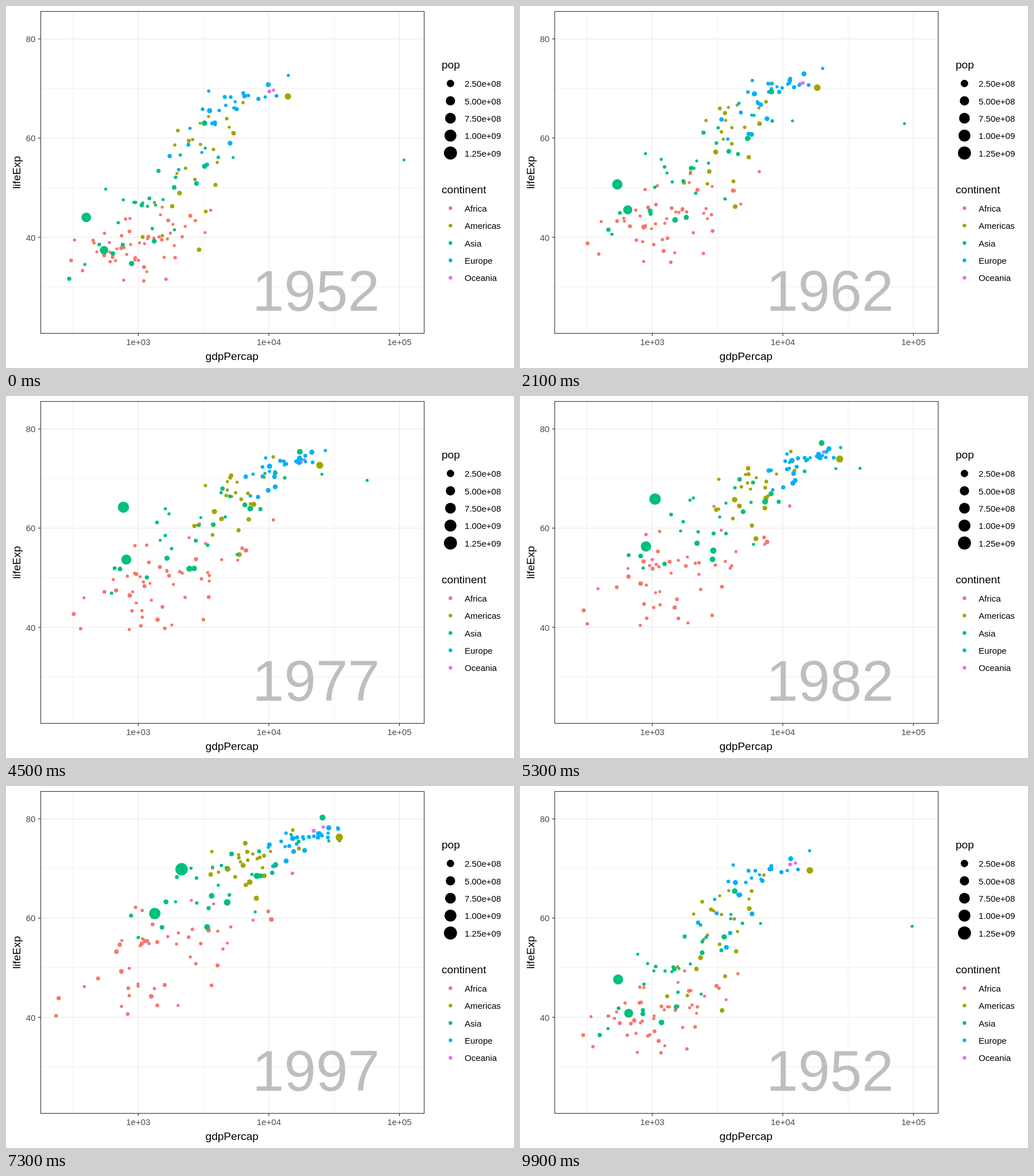
Recreate the animation shown at these times as an HTML page. Size 885 by 632 pixels, loop 10 s.

```html
<!DOCTYPE html>
<html lang="en">
<head>
<meta charset="utf-8">
<title>Life expectancy and income</title>
<style>
  html, body { margin: 0; width: 100%; height: 100%; overflow: hidden; background: #fff; }
  svg { display: block; font-family: "Liberation Sans", Arial, sans-serif; }
  .title { font-size: 19.1px; }
  .label { font-size: 15.1px; }
  .axis { fill: #4d4d4d; }
  .year { font-size: 99.8px; fill: #bebebe; text-anchor: middle; }
  .mid { text-anchor: middle; }
  .end { text-anchor: end; }
  .major { stroke: #ebebeb; stroke-width: 1.3; }
  .minor { stroke: #ebebeb; stroke-width: .8; }
  .tick { stroke: #333; stroke-width: 1.2; }
  .frame { fill: none; stroke: #333; stroke-width: 1.1; }
</style>
</head>
<body>
<svg width="885" height="632" viewBox="0 0 885 632">
  <g id="grid"></g>
  <text class="year" id="year" x="540" y="532">1952</text>
  <g id="dots"></g>
  <rect class="frame" x="60.5" y="9.5" width="668" height="562"/>
  <g id="axes"></g>
  <text class="title mid" x="393.7" y="618">gdpPercap</text>
  <text class="title mid" transform="translate(25 290.5) rotate(-90)">lifeExp</text>
  <g id="legend"></g>
</svg>
<script>
const colors = {
  Africa: "#F8766D", Americas: "#A3A500", Asia: "#00BF7D", Europe: "#00B0F6", Oceania: "#E76BF3"
};
const states = 12, last = states - 1;
const stops = [0, 8, 17, 26, 35, 44, 52, 60, 68, 76, 84, 92, 100];

// Keys: state, mean and spread of log income, mean and spread of life expectancy.
// Populations (millions) fall off by rank from top; link ties life expectancy to income.
const areas = {
  Oceania: { count: 2, top: 9, decay: 1.5, growth: 2.2, link: 0.9, skew: 0, keys: [
    [0, 4.01, .02, 69.3, .2], [4, 4.22, .01, 71.9, .1], [7, 4.31, .03, 75.3, 1], [11, 4.47, .08, 80.7, .6]] },
  Africa: { count: 52, top: 18, decay: 0.09, growth: 3.2, link: 0.4, skew: 0, keys: [
    [0, 3, .29, 39.1, 5], [4, 3.18, .33, 47.5, 6.3], [7, 3.17, .37, 53, 7.6], [11, 3.22, .43, 54.8, 9]] },
  Americas: { count: 24, top: 45, decay: 0.19, growth: 2.9, link: 0.65, skew: 0.15, keys: [
    [0, 3.44, .22, 52.7, 9], [4, 3.7, .22, 62, 7.3], [7, 3.8, .22, 67.8, 5.4], [11, 3.93, .26, 73.4, 4.2]] },
  Europe: { count: 30, top: 62, decay: 0.13, growth: 1.3, link: 0.85, skew: 0.2, keys: [
    [0, 3.66, .25, 64.4, 6.3], [4, 4.03, .2, 70.8, 3.2], [7, 4.19, .2, 73.6, 2.9], [11, 4.33, .25, 77.6, 2.8]] },
  Asia: { count: 29, top: 80, decay: 0.2, growth: 2.7, link: 0.8, skew: 0.1, keys: [
    [0, 3.08, .33, 46, 9], [4, 3.4, .46, 57, 9.2], [7, 3.57, .5, 64.4, 8], [11, 3.75, .52, 70.3, 7.4]] }
};

// The dots that stand out; keys: state, income, life expectancy.
const landmarks = [
  { area: "Asia", pop: [0.16, 2.5], keys: [
    [0, 108382, 55.6], [3, 80895, 64.6], [4, 109348, 67.7], [5, 59265, 69.3], [7, 28118, 74.2], [11, 47307, 77.6]] },
  { area: "Asia", pop: [86, 127], keys: [
    [0, 3217, 63], [4, 14779, 73.4], [7, 22376, 78.7], [11, 31656, 82.6]] },
  { area: "Americas", pop: [158, 301], keys: [
    [0, 13990, 68.4], [4, 21806, 71.3], [7, 29884, 75], [11, 42952, 78.2]] },
  { area: "Asia", pop: [372, 1110], keys: [
    [0, 547, 37.4], [4, 724, 50.7], [7, 977, 58.6], [10, 1747, 62.9], [11, 2452, 64.7]] },
  { area: "Asia", pop: [556, 1319], keys: [
    [0, 400, 44], [1, 576, 50.5], [2, 488, 44.5], [3, 613, 58.4], [4, 677, 63.1], [5, 741, 64],
    [7, 1379, 67.3], [10, 3119, 72], [11, 4959, 73]] }
];

const lerp = (a, b, t) => a + (b - a) * t;
const px = logGdp => 230.4 + (logGdp - 3) * 227.5;
const py = life => 403.8 - (life - 40) * 8.658;
const radius = pop => 2.45 + 9.2 * Math.sqrt(pop / 1319);
const byId = id => document.getElementById(id);

function make(parent, tag, attrs, text = "") {
  const el = document.createElementNS("http://www.w3.org/2000/svg", tag);
  for (const key in attrs) el.setAttribute(key, attrs[key]);
  el.textContent = text;
  return parent.appendChild(el);
}

// Values of a keyed course at a state.
function at(keys, state) {
  const n = Math.max(1, keys.findIndex(key => key[0] >= state));
  const [from, ...a] = keys[n - 1], [to, ...b] = keys[n];
  return a.map((v, k) => lerp(v, b[k], (state - from) / (to - from)));
}

let seed = 1952;
function random() {
  seed = (seed * 1664525 + 1013904223) % 4294967296;
  return seed / 4294967296;
}
// Bell-shaped value for u between 0 and 1, without far outliers.
function bell(u) {
  const v = lerp(0.03, 0.97, u);
  return Math.log(v / (1 - v)) / 1.7;
}

const dots = [];
// place(i, s) gives [log income, life, population] at state i, with s running from 0 to 1.
function addDot(area, place) {
  const path = Array.from({ length: states }, (_, i) => {
    const [logGdp, life, pop] = place(i, i / last);
    return [px(logGdp), py(life), radius(pop)];
  });
  dots.push({ path, el: make(byId("dots"), "circle", { fill: colors[area] }) });
}

function addArea(name, { count, top, decay, growth, link, skew, keys }) {
  for (let rank = 0; rank < count; rank++) {
    const rich = bell((rank + 0.5) * 0.618034 % 1);
    const [fit, richLater, fitLater] = [0, 0, 0].map(() => bell(random()));
    const pop = top * Math.exp(-decay * rank);
    addDot(name, (i, s) => {
      const [income, incomeSpread, life, lifeSpread] = at(keys, i);
      // Each dot slowly changes its standing within the area.
      const drift = (a, b) => a * Math.cos(0.7 * s) + b * Math.sin(0.7 * s) + 0.08 * bell(random());
      const x = drift(rich, richLater);
      const y = link * x + Math.sqrt(1 - link * link) * drift(fit, fitLater);
      return [
        income + incomeSpread * x,
        life + lifeSpread * (y - skew * (y * y - 1)),
        pop * growth ** s
      ];
    });
  }
}

Object.entries(areas).forEach(([name, area]) => addArea(name, area));
landmarks.forEach(({ area, pop: [from, to], keys }) => {
  const logKeys = keys.map(([state, gdp, life]) => [state, Math.log10(gdp), life]);
  addDot(area, (i, s) => [...at(logKeys, i), from * (to / from) ** s]);
});

function drawChart() {
  const grid = byId("grid"), axes = byId("axes"), legend = byId("legend");
  const vline = (x, c) => make(grid, "line", { class: c, x1: x, x2: x, y1: 10, y2: 571 });
  const hline = (y, c) => make(grid, "line", { class: c, x1: 60, x2: 728, y1: y, y2: y });
  [2.5, 3.5, 4.5].forEach(v => vline(px(v), "minor"));
  [30, 50, 70].forEach(v => hline(py(v), "minor"));
  [3, 4, 5].forEach(v => {
    const x = px(v);
    vline(x, "major");
    make(axes, "line", { class: "tick", x1: x, x2: x, y1: 572, y2: 576 });
    make(axes, "text", { class: "label axis mid", x, y: 592 }, "1e+0" + v);
  });
  [40, 60, 80].forEach(v => {
    const y = py(v);
    hline(y, "major");
    make(axes, "line", { class: "tick", x1: 56, x2: 60, y1: y, y2: y });
    make(axes, "text", { class: "label axis end", x: 51.5, y: y + 5.7 }, v);
  });

  const entry = (y, r, fill, text) => {
    make(legend, "circle", { cx: 774.3, cy: y, r, fill });
    make(legend, "text", { class: "label", x: 799, y: y + 6 }, text);
  };
  make(legend, "text", { class: "title", x: 759, y: 109 }, "pop");
  ["2.50e+08", "5.00e+08", "7.50e+08", "1.00e+09", "1.25e+09"].forEach((text, i) =>
    entry(135.2 + i * 30.35, radius(+text / 1e6), "#000", text));
  make(legend, "text", { class: "title", x: 759, y: 326.5 }, "continent");
  Object.entries(colors).forEach(([name, fill], i) => entry(353 + i * 30.35, 3.2, fill, name));
}

let shown = -1;
function draw() {
  const tick = Math.floor(performance.now() / 100) % 100;
  if (tick !== shown) {
    shown = tick;
    const i = stops.findIndex((_, n) => tick < stops[n + 1]);
    const next = (i + 1) % states;
    const t = (tick - stops[i]) / (stops[i + 1] - stops[i]);
    for (const { path, el } of dots) {
      ["cx", "cy", "r"].forEach((name, k) =>
        el.setAttribute(name, lerp(path[i][k], path[next][k], t).toFixed(2)));
    }
    byId("year").textContent = 1952 + 5 * (t < 0.5 ? i : next);
  }
  requestAnimationFrame(draw);
}

drawChart();
draw();
</script>
</body>
</html>
```
